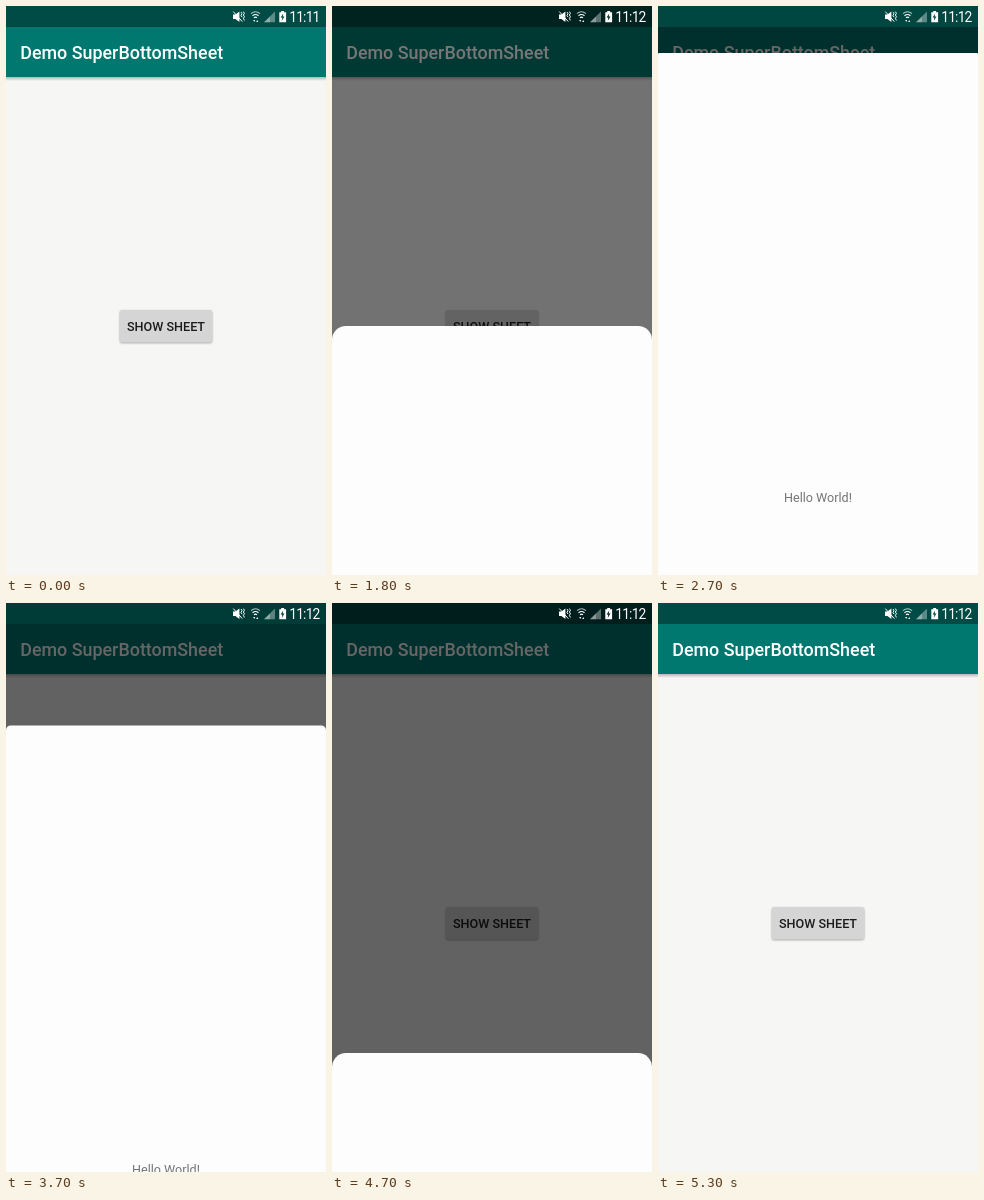
An HTML page that plays this animation: 320 px wide and 569 px high, repeating every 5400 ms.

```html
<!DOCTYPE html>
<html lang="en">
<head>
<meta charset="utf-8">
<title>Bottom sheet demo</title>
<style>
  html, body { margin: 0; width: 100%; height: 100%; overflow: hidden; background: #f6f6f5; }
  svg { display: block; width: 100%; height: 100%; font-family: Roboto, sans-serif; }
  .medium { font-weight: 500; }
  #clock { font-size: 13.8px; letter-spacing: -.8px; }
</style>
</head>
<body>
<svg viewBox="0 0 320 569">
  <defs>
    <linearGradient id="barShadow" x2="0" y2="1">
      <stop offset="0" stop-opacity=".26"/>
      <stop offset="1" stop-opacity="0"/>
    </linearGradient>
    <filter id="soft" x="-10%" y="-30%" width="120%" height="160%"><feGaussianBlur stdDeviation="1.1"/></filter>
    <clipPath id="buttonShape"><rect x="114" y="304" width="92" height="32.5" rx="1.8"/></clipPath>
  </defs>

  <rect width="320" height="569" fill="#f6f6f5"/>
  <rect y="71" width="320" height="4" fill="url(#barShadow)"/>
  <rect y="21" width="320" height="50" fill="#007870"/>
  <text class="medium" x="14.2" y="53" font-size="17.9" fill="#fff">Demo SuperBottomSheet</text>

  <rect x="114" y="305" width="92" height="32" rx="2" opacity=".38" filter="url(#soft)"/>
  <g clip-path="url(#buttonShape)">
    <rect x="114" y="304" width="92" height="33" fill="#d5d5d5"/>
    <rect id="press" x="114" y="304" width="92" height="33"/>
    <circle id="ripple" cx="177" cy="321"/>
  </g>
  <text class="medium" x="160" y="325" font-size="12.6" text-anchor="middle" fill="#1c1c1c">SHOW SHEET</text>

  <rect id="dim" width="320" height="569"/>

  <g id="sheet">
    <rect id="panel" width="320" height="620" fill="#fdfdfd"/>
    <text x="160" y="449" font-size="12.6" text-anchor="middle" fill="#757575">Hello World!</text>
  </g>

  <rect id="status" width="320" height="21"/>
  <g fill="#fff">
    <path d="M227 8.5h2.4l4-3v10.6l-4-3H227z"/>
    <path d="M227.3 5.6l9 10M235 6l1 1.7-1 1.7 1 1.7M237.4 5.6l1 1.7-1 1.7 1 1.7-1 1.7 1 2" fill="none" stroke="#fff"/>
    <g fill="none" stroke="#fff" stroke-width="1.1">
      <path d="M245 7.6q4.5-3.6 9 0" opacity=".7"/>
      <path d="M246.5 9.7q3-2.4 6 0"/>
      <path d="M248 11.7q1.5-1.2 3 0"/>
    </g>
    <path d="M247.2 14h2l-1 2zM250.2 16h2l-1-2z"/>
    <path d="M269 5.5v10.7h-11z" opacity=".36"/>
    <path d="M264 10.4v5.8h-6z" opacity=".3"/>
    <path d="M275.2 5h2.9v1.2h2v10h-6.8v-10h1.9z"/>
    <path id="bolt" d="M277.2 7.5l-2.6 4h1.7l-.6 3.4 2.8-4.3h-1.8z"/>
    <text id="clock" x="283.2" y="16"></text>
  </g>
</svg>
<script>
const LOOP = 5400, TICK = 100;
const TOP = 21, PEEK = 320, HIDDEN = 575, RADIUS = 14;
const DRAG = 273, SNAP = PEEK - TOP - DRAG;

const el = id => document.getElementById(id);
const clamp = v => Math.max(0, Math.min(1, v));
const ramp = (t, from, to) => clamp((t - from) / (to - from));
const easeOut = (t, from, to, power = 2) => 1 - (1 - ramp(t, from, to)) ** power;

function set(id, attributes) {
  for (const [name, value] of Object.entries(attributes)) el(id).setAttribute(name, value);
}

// Slide in, drag up, snap to the top, fall back to the peek height, leave
function sheetTop(t) {
  return PEEK
    + 140 * (1 - ramp(t, 1600, 1800))
    - DRAG * ramp(t, 2000, 2700) ** 3
    - SNAP * easeOut(t, 2700, 2900)
    + (PEEK - TOP) * easeOut(t, 3600, 4000, 1.44)
    + (HIDDEN - PEEK) * easeOut(t, 4600, 4900, 1.76);
}

function draw(t) {
  const y = sheetTop(t);
  const dim = .6 * (easeOut(t, 1600, 1900) - ramp(t, 4900, 5200));
  const lift = clamp((PEEK - y) / (PEEK - TOP));
  const light = 1 - dim * (1 - lift);
  const statusColor = `rgb(0,${Math.round(75 * light)},${Math.round(69 * light)})`;
  const release = 1 - ramp(t, 1600, 1800);

  set("sheet", { transform: `translate(0 ${y})`, opacity: ramp(t, 1600, 1800) });
  set("panel", { rx: RADIUS * (1 - lift) });
  set("dim", { opacity: dim });
  set("status", { fill: statusColor });
  set("bolt", { fill: statusColor });
  set("press", { opacity: .06 * ramp(t, 1400, 1600) * release });
  set("ripple", { opacity: .07 * release, r: 80 * ramp(t, 1400, 1700) ** 1.65 });
  el("clock").textContent = t < 1700 ? "11:11" : "11:12";
}

// The screen refreshes ten times a second
const start = performance.now();
function frame() {
  const t = (performance.now() - start) % LOOP;
  draw(Math.floor(t / TICK) * TICK);
  requestAnimationFrame(frame);
}
frame();
</script>
</body>
</html>
```
